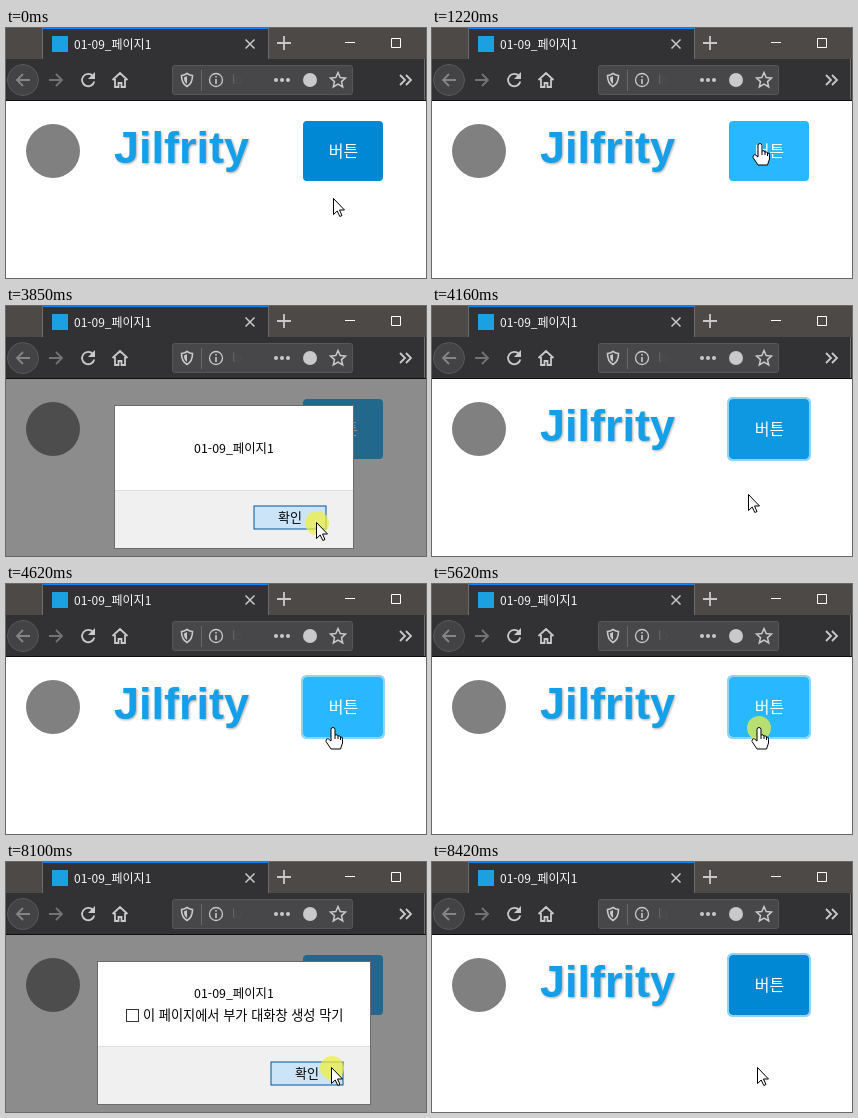
Animation, 420 px wide and 250 px high, one loop 8.8 s. Source, as an HTML page:

```html
<!DOCTYPE html>
<html lang="ko">
<head>
<meta charset="utf-8">
<title>Page dialog</title>
<style>
  html, body { margin: 0; width: 100%; height: 100%; overflow: hidden; background: #fff; }
  svg { display: block; width: 420px; height: 250px; }
  text { font: 12px "Noto Sans CJK KR", "Noto Sans CJK", "Noto Sans", sans-serif; }
  .icon { fill: none; stroke: #c9c9cb; stroke-width: 1.8; }
  .dialog text { text-anchor: middle; font-size: 12.4px; }
  .dialog .label { text-anchor: start; font-size: 13.2px; }
  .dialog .ok { font-size: 13px; }
  .wordmark { font: bold 45px "Liberation Sans", sans-serif; fill: #14a0e8; filter: drop-shadow(1px 1px 1px #aaa); }
</style>
</head>
<body>
<svg viewBox="0 0 420 250">
  <!-- page -->
  <rect width="420" height="250" fill="#fff"/>
  <circle cx="47" cy="123" r="27" fill="#808080"/>
  <text class="wordmark" x="108" y="135">Jilfrity</text>
  <rect id="ring" x="296" y="92" width="82" height="62" rx="4.5" fill="none" stroke="#90d3f3" stroke-width="2"/>
  <rect id="button" x="297" y="93" width="80" height="60" rx="4"/>
  <text x="337.5" y="129" text-anchor="middle" fill="#fff" style="font-size:16px">버튼</text>
  <rect id="shade" y="73" width="420" height="177" fill="#1a1a1a" opacity=".5"/>

  <!-- dialogs -->
  <g id="dialog1" class="dialog">
    <rect x="109" y="100" width="238" height="142" fill="#fff"/>
    <path d="M109 184h238v58H109z" fill="#f0f0f0"/>
    <path d="M109 184.5h238" stroke="#dfdfdf"/>
    <rect x="108.5" y="99.5" width="239" height="143" fill="none" stroke="#6b6b6b"/>
    <text x="228" y="147">01-09_페이지1</text>
    <rect id="ok1" x="248" y="200" width="72" height="23"/>
    <text class="ok" x="284" y="216">확인</text>
  </g>
  <g id="dialog2" class="dialog">
    <rect x="92" y="100" width="272" height="142" fill="#fff"/>
    <path d="M92 184h272v58H92z" fill="#f0f0f0"/>
    <path d="M92 184.5h272" stroke="#dfdfdf"/>
    <rect x="91.5" y="99.5" width="273" height="143" fill="none" stroke="#6b6b6b"/>
    <text x="228" y="136">01-09_페이지1</text>
    <rect id="check" x="120.5" y="147.5" width="12" height="12" fill="#fff"/>
    <text class="label" x="137" y="158">이 페이지에서 부가 대화창 생성 막기</text>
    <rect id="ok2" x="265" y="200" width="72" height="23"/>
    <text class="ok" x="301" y="216">확인</text>
  </g>

  <!-- browser frame -->
  <rect width="420" height="31" fill="#4c4947"/>
  <rect y="31" width="420" height="41" fill="#323234"/>
  <rect y="72" width="420" height="1" fill="#110c0d"/>
  <path d="M36.5 0v31M262.5 0v31M418.5 31v41" stroke="#6f6d6c"/>
  <rect x="37" width="225" height="32" fill="#323234"/>
  <rect x="37" width="225" height="1" fill="#0a84ff"/>
  <rect x="46" y="8" width="16" height="16" fill="#1ba1e2"/>
  <text x="68" y="21" fill="#f9f9fa">01-09_페이지1</text>
  <path class="icon" style="stroke-width:1.5" d="M239.500 11.500l9 9m0-9l-9 9"/>
  <path class="icon" d="M271 15h14M278 8v14"/>
  <path d="M339 14.500h10M385.500 10.500h9v9h-9z" fill="none" stroke="#fff"/>

  <circle cx="17" cy="52" r="15.500" fill="#434345" stroke="#58585a"/>
  <path class="icon" style="stroke:#858587" d="M24 52H11m6-6l-6 6 6 6"/>
  <path class="icon" style="stroke:#737375" d="M43 52h13m-6-6l6 6-6 6"/>
  <path class="icon" d="M87 48a6.200 6.200 0 1 0 1.300 5.500"/>
  <path d="M89 44v7h-7z" fill="#c9c9cb"/>
  <path class="icon" d="M106.500 52l7.500-7 7.500 7M109 51v8h3.500v-4h3v4h3.500v-8"/>
  <rect x="166.500" y="37.500" width="180" height="29" rx="2" fill="#474749" stroke="#57575a"/>
  <path class="icon" style="stroke-width:1.600" d="M181 45.500q3 2 5.500 2 0 8-5.500 11-5.500-3-5.500-11 2.500 0 5.500-2z"/>
  <path d="M181 48v8q-3-2-3-6.500z" fill="#c9c9cb"/>
  <path d="M195.500 42v21" stroke="#68686b"/>
  <circle class="icon" cx="210" cy="52" r="6.500" style="stroke-width:1.300"/>
  <path class="icon" style="stroke-width:1.600" d="M210 51v5M210 48v1.600"/>
  <text x="226" y="56" fill="#66666a">l</text>
  <text x="229" y="56" fill="#4e4e51">o</text>
  <g fill="#c9c9cb">
    <circle cx="270" cy="52" r="2"/><circle cx="276" cy="52" r="2"/><circle cx="282" cy="52" r="2"/>
    <circle cx="304" cy="52" r="7"/>
  </g>
  <path class="icon" style="stroke-width:1.500" d="M332 44.500l2.200 5 5.300.5-4 3.600 1.200 5.400-4.700-2.800-4.700 2.800 1.200-5.400-4-3.600 5.300-.5z"/>
  <path class="icon" d="M394 47l5 5-5 5m6-10l5 5-5 5"/>

  <!-- pointer -->
  <g id="pointer" stroke="#000" fill="#fff" stroke-linejoin="round">
    <circle id="click" r="12" fill="#eeee3c" stroke="none" opacity=".72"/>
    <path id="arrow" d="M-.5-.5V15.500L3.200 12 5.800 17.500 8 16.500 5.500 11H10.500z"/>
    <g id="hand">
      <path d="M-2 1.500Q-2-.5 0-.5T2 1.500V7Q4.500 6 5 8 7 7.300 7.500 9 10 8.500 9.500 11.500V15L7.500 21H-2L-7 13.500Q-7 10-4.500 11L-2 13z"/>
      <path d="M2 7v4M5 8v3M7.500 9v3" fill="none"/>
    </g>
  </g>
</svg>
<script>
const LOOP = 8800;
const el = id => document.getElementById(id);
const show = (id, on) => el(id).style.display = on ? '' : 'none';
const within = (t, a, b) => t >= a && t < b;

// Progress in n equal jumps: the first at a, the last at b.
function steps(t, a, b, n) {
  if (t < a) return 0;
  return Math.min(1, (Math.floor((t - a) / (b - a) * (n - 1) + 1e-6) + 1) / n);
}

// start, end, jumps, x, y
const moves = [
  [1060, 1220, 3, 328, 116],
  [2840, 3000, 3, 311, 217],
  [4080, 4620, 8, 327, 144],
  [7010, 7170, 3, 326, 206]
];
const clicks = [[2230, 2305], [3850, 4080], [5480, 5625], [8100, 8250]];

function pointerAt(t) {
  let x = 328, y = 171;
  for (const [a, b, n, toX, toY] of moves) {
    const eased = Math.sin(steps(t, a, b, n) * Math.PI / 2);
    x += (toX - x) * eased;
    y += (toY - y) * eased;
  }
  return [Math.round(x), Math.round(y)];
}

function buttonColor(t) {
  const hover = steps(t, 1060, 1220, 3) - steps(t, 4080, 4235, 3)
              + steps(t, 4465, 4620, 3) - steps(t, 8250, 8420, 3);
  const mix = (a, b) => Math.round(a + (b - a) * hover);
  return `rgb(${mix(0, 41)},${mix(136, 184)},${mix(212, 255)})`;
}

function styleOk(id, pressed, hovered) {
  const [fill, stroke, width] = pressed ? ['#cce4f7', '#005499', 1]
    : hovered ? ['#e5f1fb', '#0078d7', 1] : ['#e1e1e1', '#0078d7', 2];
  Object.assign(el(id).style, { fill, stroke, strokeWidth: width });
}

function render(t) {
  const [x, y] = pointerAt(t);
  const first = within(t, 2305, 4080), second = within(t, 5625, 8250);
  const modal = first || second;
  const clicking = clicks.some(([a, b]) => within(t, a, b));
  const overButton = !modal && y < 153;

  show('dialog1', first);
  show('dialog2', second);
  show('shade', modal);
  show('ring', t >= 4080 && !modal);
  show('click', clicking);
  show('hand', overButton);
  show('arrow', !overButton);
  el('button').style.fill = buttonColor(t);
  el('check').style.stroke = y < 165 ? '#0078d7' : '#333';
  for (const id of ['ok1', 'ok2']) styleOk(id, clicking, y > 199);
  el('pointer').setAttribute('transform', `translate(${x} ${y})`);
}

const began = performance.now();
function frame() {
  render((performance.now() - began) % LOOP);
  requestAnimationFrame(frame);
}
frame();
</script>
</body>
</html>
```
